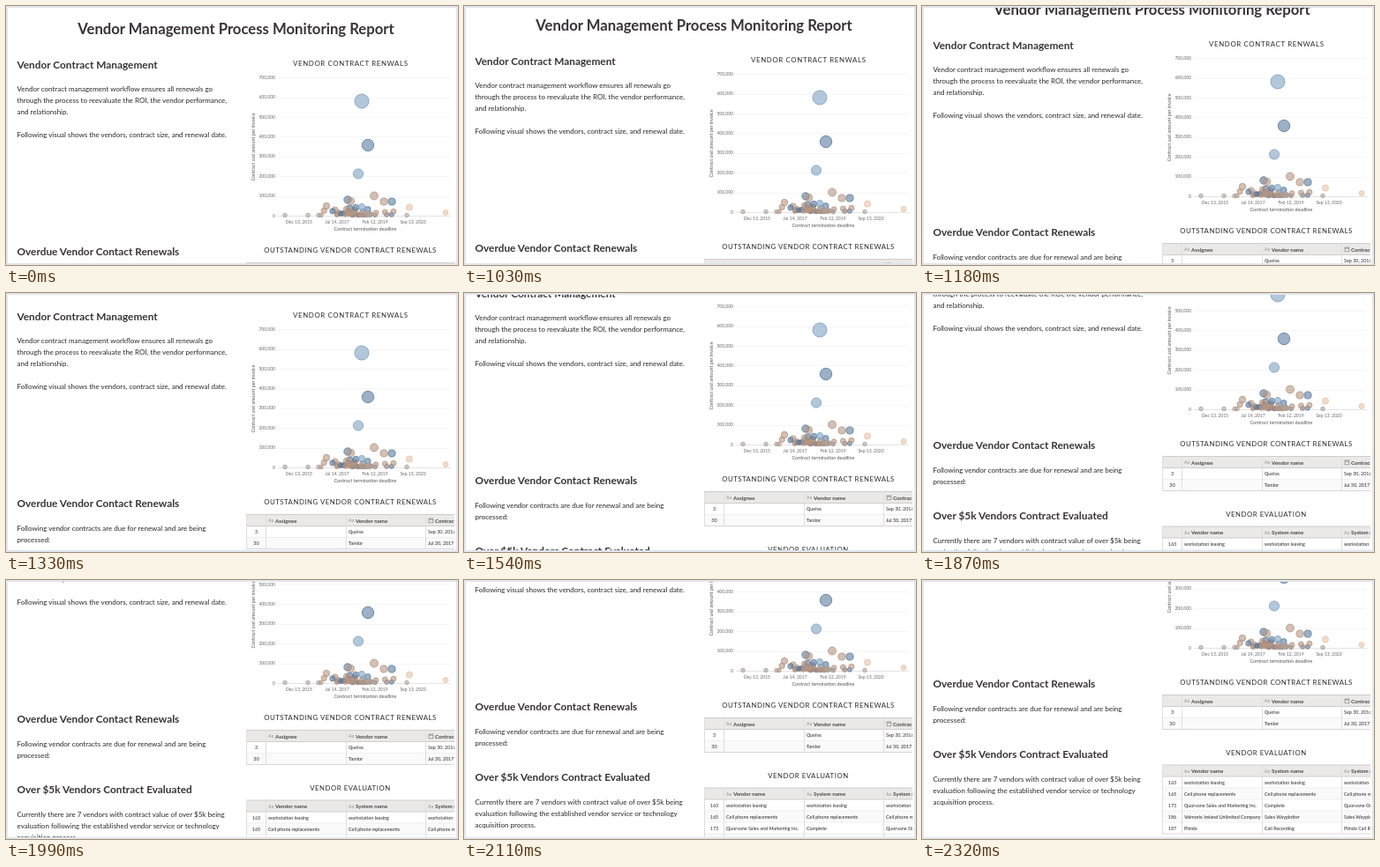
These frames come from a looping animation (512 by 294 pixels, 5.85 s). An HTML page:

```html
<!DOCTYPE html>
<html lang="en">
<head>
<meta charset="utf-8">
<title>Process report</title>
<style>
html, body { margin: 0; width: 100%; height: 100%; overflow: hidden; background: #fff; }
svg { display: block; width: 512px; height: 294px; font-family: Lato, sans-serif; }
.title { font: bold 16.7px Lato, sans-serif; fill: #3a3337; text-anchor: middle; }
.head { font: bold 11.85px Lato, sans-serif; fill: #3a3337; }
.body { font-size: 8px; fill: #2a2729; }
.caps { font-size: 7.8px; letter-spacing: .52px; fill: #2f2b2d; text-anchor: middle; }
.chart { font-size: 7.9px; letter-spacing: .62px; }
.tick { font-size: 5px; fill: #666; }
.axis { font-size: 5.4px; fill: #555; text-anchor: middle; }
.cell { font-size: 5.4px; fill: #2a2729; }
.th { font: bold 6.15px Lato, sans-serif; fill: #4a4447; }
.aa { font-size: 5px; fill: #8d888a; }
.mid { text-anchor: middle; }
.end { text-anchor: end; }
</style>
</head>
<body>
<svg viewBox="0 0 512 294">
  <clipPath id="view"><rect x="2" y="2" width="506" height="290"/></clipPath>
  <g clip-path="url(#view)"><g id="page"></g></g>
  <rect x="1" y="1" width="510" height="292" fill="none" stroke="#e1e5eb" stroke-width="2"/>
</svg>
<script>
const page = document.getElementById('page');

function add(tag, attrs, content = '') {
  const el = document.createElementNS('http://www.w3.org/2000/svg', tag);
  for (const key in attrs) el.setAttribute(key, attrs[key]);
  el.textContent = content;
  page.append(el);
}
const text = (cls, x, y, str, more) => add('text', { class: cls, x, y, ...more }, str);
const line = (x1, y1, x2, y2, stroke) => add('line', { x1, y1, x2, y2, stroke });
const rect = (x, y, width, height, fill, more) => add('rect', { x, y, width, height, fill, ...more });
const lines = (y, ...rows) => rows.forEach((row, i) => row && text('body', 12.5, y + 13 * i, row));

// Left column
text('title', 260.5, 32, 'Vendor Management Process Monitoring Report');
text('head', 12.5, 70.7, 'Vendor Contract Management');
lines(97, 'Vendor contract management workflow ensures all renewals go',
  'through the process to reevaluate the ROI, the vendor performance,',
  'and relationship.', '',
  'Following visual shows the vendors, contract size, and renewal date.');
text('head', 12.5, 283.2, 'Overdue Vendor Contact Renewals');
lines(310, 'Following vendor contracts are due for renewal and are being', 'processed:');
text('head', 12.5, 362.7, 'Over $5k Vendors Contract Evaluated');
lines(390, 'Currently there are 7 vendors with contract value of over $5k being',
  'evaluation following the established vendor service or technology',
  'acquisition process.');

// Chart
const base = 238;
text('caps chart', 390.3, 67.5, 'VENDOR CONTRACT RENWALS');
for (let i = 0; i <= 7; i++) {
  const y = base - 22.4 * i;
  line(308, Math.round(y) + .5, 504, Math.round(y) + .5, i ? '#f6f6f6' : '#e4e4e4');
  text('tick end', 305, y + 1.6, i ? i + '00,000' : '0');
}
['Dec 13, 2015', 'Jul 14, 2017', 'Feb 12, 2019', 'Sep 13, 2020'].forEach((date, i) =>
  text('tick mid', 332 + 43 * i, 247, date));
text('axis', 407, 255, 'Contract termination deadline');
text('axis', 0, 0, 'Contract usd amount per invoice', { transform: 'translate(282 160) rotate(-90)' });

const blue = '#7c9fbf', navy = '#56779b', brown = '#b3937f', peach = '#e6c3a6', grey = '#a9a19c';
// The radius grows with the amount, so a bubble needs only x and height
function bubble(x, height, hue) {
  add('circle', {
    cx: x, cy: base - height, r: 1.9 + .54 * Math.sqrt(height),
    fill: hue, 'fill-opacity': .58, stroke: hue, 'stroke-width': .8
  });
}
let seed = 11;
const rand = () => (seed = seed * 16807 % 2147483647) / 2147483647;
[316, 342, 354, 454].forEach(x => bubble(x, .5, grey));
for (let i = 0; i < 52; i++)
  bubble(398 + (rand() + rand() - 1) * 42, .5 + 9 * rand() ** 3, [brown, brown, navy, grey, brown][i % 5]);
bubble(403, 130, blue);
bubble(410, 80, navy);
bubble(399, 47.5, blue);
bubble(417, 22.5, brown);
bubble(387, 18, navy);
bubble(390.5, 16.5, brown);
bubble(428, 16, brown);
bubble(437, 16, navy);
bubble(363, 11, brown);
bubble(403, 10, blue);
bubble(457, 9.5, peach);
bubble(498, 3.5, peach);

// Tables
const cols = [294.5, 385.5, 475.5];
function table(top, heads, rows) {
  const bottom = top + 13 * (rows.length + 1);
  rect(272, top, 240, 13, '#ebe9e7');
  rows.forEach(([id, ...cells], r) => {
    const y = top + 13 * (r + 1);
    if (r % 2) rect(272, y, 240, 13, '#fafafa');
    line(272, y, 512, y, r ? '#f0efee' : '#cfccc9');
    text('cell mid', 283.5, y + 8.6, id);
    cells.forEach((cell, i) => text('cell', cols[i] + 2.5, y + 8.6, cell));
  });
  line(272, top, 512, top, '#cfccc9');
  line(272, bottom, 512, bottom, '#d9d6d4');
  [272.5, ...cols].forEach(x => line(x, top, x, bottom, '#e0dedc'));
  heads.forEach((head, i) => {
    const x = cols[i];
    if (head.endsWith('date')) {
      rect(x + 3.5, top + 4.5, 4.8, 4.8, 'none', { stroke: '#8d888a', 'stroke-width': .7 });
      line(x + 3.5, top + 5.5, x + 8.3, top + 5.5, '#8d888a');
    } else text('aa', x + 2.5, top + 8.9, 'Aa');
    text('th', x + 10.5, top + 9, head);
  });
}
text('caps', 390, 279.5, 'OUTSTANDING VENDOR CONTRACT RENEWALS');
table(291.5, ['Assignee', 'Vendor name', 'Contract date'], [
  [3, '', 'Quelva', 'Sep 30, 2016'],
  [30, '', 'Tamlor', 'Jul 30, 2017']
]);
text('caps', 390, 360, 'VENDOR EVALUATION');
const same = (id, name) => [id, name, name, name];
table(371, ['Vendor name', 'System name', 'System name'], [
  same(163, 'workstation leasing'),
  same(165, 'Cell phone replacements'),
  [173, 'Quorvane Sales and Marketing Inc.', 'Complete', 'Quorvane On'],
  [186, 'Velmorix Ireland Unlimited Company', 'Sales Wayplotter', 'Sales Wayplotter'],
  [187, 'Plindo', 'Call Recording', 'Plindo Call Recording']
]);

// Scroll: 44 equal steps of 30 ms, starting at 1030 ms
function frame() {
  const t = performance.now() % 5850;
  const step = Math.max(0, Math.min(44, Math.floor((t - 1030) / 30) + 1));
  page.setAttribute('transform', `translate(0 ${-Math.round(step * 3.66)})`);
  requestAnimationFrame(frame);
}
frame();
</script>
</body>
</html>
```
